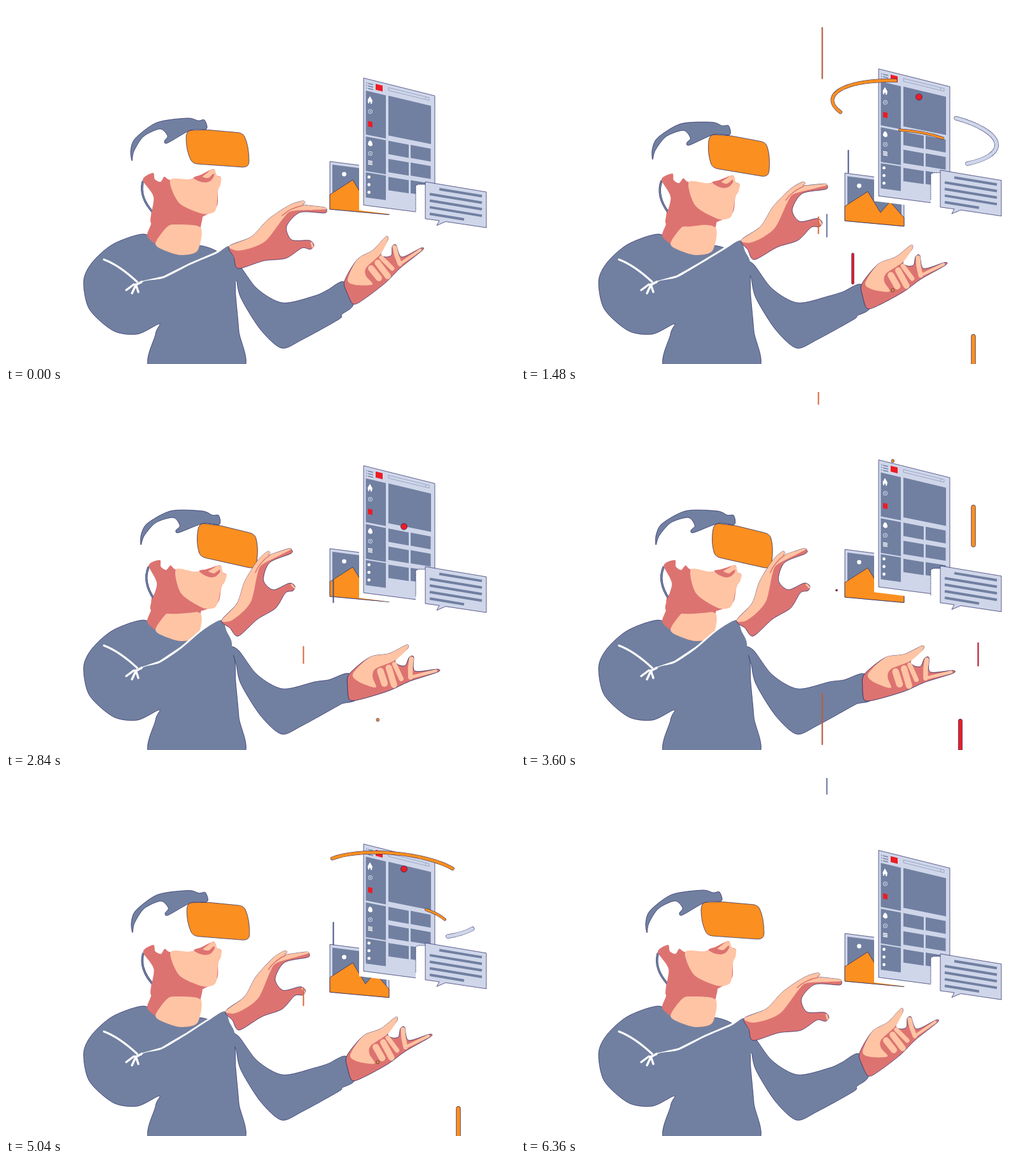
An HTML page that plays this animation: 800 by 562 pixels, repeating every 6.4 s.

```html
<!DOCTYPE html>
<html lang="en">
<head>
<meta charset="utf-8">
<title>Virtual reality</title>
<style>
  html, body { margin: 0; width: 100%; height: 100%; overflow: hidden; background: #fff; }
  svg { display: block; width: 100vw; height: 100vh; }
</style>
</head>
<body>
<svg id="stage" viewBox="0 0 800 562"></svg>
<script>
const LOOP = 6400;
const NAVY = '#7180a1', PALE = '#cfd6ea', ORANGE = '#fb8f20', RED = '#ed1c24';
const SKIN = '#fec4a4', SHADE = '#dd7371', INK = '#23235f', WHITE = '#fff', GREY = '#9aa6c4';

const stage = document.getElementById('stage');

function add(parent, tag, attrs) {
  const node = document.createElementNS('http://www.w3.org/2000/svg', tag);
  for (const key in attrs) node.setAttribute(key, attrs[key]);
  return parent.appendChild(node);
}
const group = () => add(stage, 'g', {});
const outline = on => on ? { stroke: INK, 'stroke-width': 0.7 } : {};

function points(text) {
  const n = text.trim().split(/\s+/).map(Number);
  return Array.from({ length: n.length / 2 }, (_, i) => [n[2 * i], n[2 * i + 1]]);
}

// Closed soft curve through the points
function softPath(pts, k = 0.14) {
  const at = i => pts[(i + pts.length) % pts.length];
  return 'M' + pts[0] + pts.map((p, i) => {
    const [a, b, c] = [at(i - 1), at(i + 1), at(i + 2)];
    return `C${p[0] + (b[0] - a[0]) * k} ${p[1] + (b[1] - a[1]) * k} ` +
           `${b[0] - (c[0] - p[0]) * k} ${b[1] - (c[1] - p[1]) * k} ${b[0]} ${b[1]}`;
  }).join('') + 'Z';
}
const soft = (parent, fill, text, inked) =>
  add(parent, 'path', { d: softPath(points(text)), fill, ...outline(inked) });
const poly = (parent, fill, pts, inked) =>
  add(parent, 'polygon', { points: pts, fill, ...outline(inked) });
const line = (parent, d, stroke, width, cap = 'round') => add(parent, 'path',
  { d, fill: 'none', stroke, 'stroke-width': width, 'stroke-linecap': cap, 'stroke-linejoin': 'round' });
const dot = (parent, cx, cy, r, fill) => add(parent, 'circle', { cx, cy, r, fill });

// Picture card
const card = group();
poly(card, PALE, '509,244 602,256 602,327.5 509,319', true);
poly(card, NAVY, '513,249 598,260 598,324 513,316');
poly(card, ORANGE, '509,296 545,273 565,306 580,289 602,314 602,327.5 509,319', true);
dot(card, 531.5, 264, 3.4, WHITE);

// Browser window: y is measured on the left edge, and rows slope less towards the bottom
const browser = group();
const sloped = (x, y) => y + (x - 562) * (0.25 - 0.0006 * (y - 112));
const slab = (fill, x1, x2, y1, y2, inked) => poly(browser, fill,
  [[x1, y1], [x2, y1], [x2, y2], [x1, y2]].map(([x, y]) => [x, sloped(x, y)]), inked);
slab(WHITE, 555, 676, 106, 321);
slab(PALE, 562, 674, 112.5, 312, true);
slab(RED, 581, 592, 117, 126.5);
slab(PALE, 601, 665, 118, 122.5).setAttribute('stroke', GREY);
slab(GREY, 659, 660, 118, 122.5);
slab(NAVY, 601, 668, 131, 195);
for (let i = 0; i < 3; i++) {
  slab(NAVY, 566, 567.5, 118.5 + 4 * i, 120 + 4 * i);
  slab(NAVY, 569, 577, 118.5 + 4 * i, 120 + 4 * i);
  slab(NAVY, 601, 633, 203.5 + 29 * i, 225 + 29 * i);
  slab(NAVY, 636, 667.5, 203 + 29 * i, 224.5 + 29 * i);
}
slab(NAVY, 565.5, 597, 131.5, 200.5);
slab(NAVY, 565.5, 597, 203.5, 258);
slab(NAVY, 565.5, 597, 260, 299.5);
poly(browser, WHITE, '572,141 576,148 575,153 573,153 573,150 571,150 571,152.5 569,152 568.5,147');
slab(RED, 569, 576, 178.5, 187);
soft(browser, WHITE, '572.5 210.5 575 213 576 218 572.5 219.5 569 217 570 212.5');
for (const y of [165, 231]) {
  dot(browser, 572.5, y, 3.5, PALE);
  dot(browser, 572.5, y, 2.5, NAVY);
  dot(browser, 572.5, y, 1.1, PALE);
}
for (let i = 0; i < 3; i++) {
  slab(WHITE, 569, 576, 240.5 + 2.5 * i, 242 + 2.5 * i);
  dot(browser, 570.5, 268 + 12 * i, 2.4, WHITE);
}

// Chat bubble
const chat = group();
poly(chat, WHITE, '644,282 648,280 659,280 659,340 644,340');
line(chat, 'M644 322V282l4 -2h11', INK, 0.7).setAttribute('stroke-dasharray', '2 1.5');
poly(chat, PALE, '659,276 755,292 755,348 691,338.5 677,344.5 681,337 659,334', true);
for (let i = 0; i < 5; i++) {
  const left = i ? 666 : 681, right = i < 4 ? 748 : 720;
  const y = x => 298.5 + 10.3 * i + 0.165 * (x - 748);
  line(chat, `M${left} ${y(left)}L${right} ${y(right)}`, NAVY, 4, 'butt');
}

// Orbiting strokes: each sweeps along an open, tilted elliptic arc
function orbit(cx, cy, rx, ry, from, sweep, width, color, starts) {
  const g = add(stage, 'g', { transform: `rotate(5 ${cx} ${cy})` });
  const strokes = [line(g, '', INK, width + 1), line(g, '', color, width)];
  const at = f => {
    const a = (from + sweep * f) * Math.PI / 180;
    return `${cx + rx * Math.cos(a)} ${cy + ry * Math.sin(a)}`;
  };
  return t => {
    const head = starts.map(s => (t - s) * 0.0009).find(h => h > 0 && h < 1.39);
    const a = Math.max(0, head - 0.39), b = Math.min(1, head);
    const d = head ? `M${at(a)}A${rx} ${ry} 0 0 1 ${at(b)}` : '';
    strokes.forEach(s => s.setAttribute('d', d));
  };
}
const orbits = [
  orbit(617, 208, 131, 43, 133, 279, 5.5, PALE, [385, 3601]),
  orbit(600, 226, 96, 31, 225, 113, 3.4, ORANGE, [647, 3796]),
  orbit(606, 157, 117, 39, 136, 278, 4.6, ORANGE, [985, 4290])
];

// Far arm and torso
const sleeve = add(stage, 'path', { fill: NAVY, ...outline(true) });
soft(stage, NAVY, `217 358 168 374 135 403 122 432 131 476 169 510 207 515 241 499 235 515 230 572
  369.5 572 366 510 361 455 358 415 333 386 303 376 285 386 245 378`, true);

// Neck
soft(stage, SHADE, '222 361 228 342 231 320 262 312 306 325 306 347 301 384 278 391 258 387 237 375');
soft(stage, SKIN, '235 374 253 347 268 343 306 348 301 384 278 391 258 387');

// Head
const head = group();
line(head, 'M215 276Q209 300 231 324', INK, 3.4);
line(head, 'M215 276Q209 300 231 324', NAVY, 2.4);
soft(head, SHADE, `215 273 231 262 234 272 243 276 249 268 258 273 290 272 322 257 328 258 331 266 338 270
  333 290 331 315 306 332 260 343 228 341 232 300`);
soft(head, SKIN, `258 273 290 272 313 264 322 257 328 258 331 266 338 270 337 281 333 290 331 315 326 324
  308 326 272 309`);
soft(head, SHADE, '295 269 313 264 309 268 318 270 326 263 327 267 322 274 314 277 303 275');
soft(head, NAVY, `198 243 196 227 203 208 237 183 285 176 302 180 312 179 315 193 290 195 254 215 249 212
  254 204 242 193 216 205 201 228`, true);
add(head, 'path', { d: `M292 195Q283 195 283 207Q283 226 290 241Q293 247 301 248L372 253Q382 253 382 244
  Q382 220 375 205Q372 199 363 198.5L318 194.5Z`, fill: ORANGE, ...outline(true) });

// Near arm with its white crease
const crease = line(stage, '', WHITE, 4);
const nearArm = add(stage, 'path', { fill: NAVY });
line(stage, 'M154 398Q178 407 206 433', WHITE, 3.2);
line(stage, 'M189 446L201 437M198 451L204 438L213 433M204 437L208 449', WHITE, 3.4);

// Reaching hand
const nearHand = group();
soft(nearHand, SHADE, `351 377 386 362 412 335 445 313 466 306 470 309 467 312 500 316 504 320 500 325
  462 324 441 346 449 367 477 368 484 376 478 382 465 380 440 396 405 400 365 412 358 394`, true);
soft(nearHand, SKIN, `351 377 386 362 412 335 445 313 466 306 470 309 467 312 500 316 503 319 484 320
  449 322 436 333 410 367 388 379 364 384`);
line(nearHand, 'M434 329Q447 317 467 313', SHADE, 1.6);
line(nearHand, 'M480 372L482 378', SKIN, 3);

// Open hand
const farHand = group();
soft(farHand, SHADE, `532 432 552 398 577 383 597 362 600 367 589 389 597 394 606 391 607 378 613 375
  622 394 652 380 654 384 620 411 597 434 563 460 546 468 536 450`, true);
soft(farHand, SKIN, `537 430 552 398 577 383 597 362 600 367 589 389 566 411 566 424 576 437 550 438`);
line(farHand, 'M574 412L586 427', SKIN, 10);
line(farHand, 'M584 403L600 424', SKIN, 9.5);
line(farHand, 'M590 395L607 412', SKIN, 7);
line(farHand, 'M611 379L614 392L619 405', SKIN, 7);
line(farHand, 'M622 403L651 383', SKIN, 4.5);

// Falling pieces, given by the moments they enter the stage
const SPEED = 0.845;
const drops = [];
function fall(x, width, height, fill, starts) {
  for (const start of starts) {
    const node = add(stage, 'rect',
      { x: x - width / 2, width, height, rx: width / 2, fill, ...outline(width > 2.5) });
    drops.push({ node, start, height });
  }
}
const bursts = delay => [0, 759, 2038, 3279, 4319].map(burst => burst + delay);
const every = (first, gap, count = 2) => Array.from({ length: count }, (_, i) => first + gap * i);

fall(711, 6.6, 66, ORANGE, bursts(33));
fall(584.3, 4.6, 5, ORANGE, bursts(190));
fall(467.5, 2, 28, '#d9683c', bursts(297));
fall(514.5, 2, 37, '#4a5587', bursts(410));
fall(625.5, 10, 10, RED, bursts(546));
fall(690.5, 6, 101, RED, [...every(517, 1438), 2873]);
fall(750.5, 14, 14, RED, [...every(267, 1436), 3640]);
fall(732, 1.8, 73, '#5a6695', every(404, 1136));
fall(473.5, 2.2, 82, '#b5603f', [1344, ...every(1703, 1241)]);
fall(718.5, 2.2, 38, '#c01c34', every(1849, 1241));
fall(496, 3, 3, RED, every(1989, 1241));
fall(521.5, 3.6, 49, RED, every(963, 520));
fall(480.7, 1.8, 37, '#5a6695', every(1050, 5279));
fall(471.5, 4, 9, RED, [381]);
fall(644, 8, 12, NAVY, [1625]);

const clamp = u => Math.min(1, Math.max(0, u));
const easeBoth = u => (1 - Math.cos(Math.PI * clamp(u))) / 2;
const easeOut = u => 1 - (1 - clamp(u)) ** 2;
const span = (t, a, b) => (t - a) / (b - a);
const wave = (t, peak) => Math.cos(2 * Math.PI * (t - peak) / 3200);
const shiftY = (node, y) => node.setAttribute('transform', `translate(0 ${y})`);
const blend = (a, b, u) => a.map((p, i) => p.map((v, j) => v + (b[i][j] - v) * u));
const swing = (node, angle, pivot, scale, [x, y]) => node.setAttribute('transform',
  `rotate(${angle} ${pivot}) translate(${x} ${y}) scale(${scale}) translate(${-x} ${-y})`);

const armEdge = [points('213 435 248 427 290 406 330 389 350 377'), points('213 435 242 425 275 403 308 375 338 358')];
const armCuff = [points('357 393 365 412 350 440 220 470'), points('347 376 355 396 345 430 220 470')];
const farCuff = [points('505 446 531 433 546 468 528 484'), points('508 452 541 443 551 482 530 489')];
const farTop = points('352 400 366 406 395 444 435 466 485 455');
const farBottom = points('523 492 465 524 433 537 400 508 369 458 361 425 352 415');

function draw(t) {
  shiftY(card, 9.2 * (1 + wave(t, 1570)));
  shiftY(chat, -9.2 * (1 + wave(t, 1570)));
  shiftY(browser, -6 - 9.2 * wave(t, 1200));

  const nod = easeOut(span(t, 680, 2720)) - easeOut(span(t, 3840, 5430));
  head.setAttribute('transform', `rotate(${8.6 * nod} 225 335)`);

  const lift = easeBoth(span(t, 120, 2920)) - easeBoth(span(t, 3920, 6360));
  swing(nearHand, -24.8 * lift, '301 396', 1 - 0.045 * lift, [357, 394]);
  const edge = blend(...armEdge, lift);
  nearArm.setAttribute('d', softPath([...edge, ...blend(...armCuff, lift)]));
  crease.setAttribute('d', 'M' + edge.map(([x, y]) => `${x} ${y - 1}`).join('L'));

  const lower = easeBoth(span(t, 0, 3320)) - easeBoth(span(t, 3320, 6400));
  swing(farHand, 21.4 * lower, '503 459', 1 + 0.06 * lower, [540, 450]);
  sleeve.setAttribute('d', softPath([...farTop, ...blend(...farCuff, lower), ...farBottom]));

  orbits.forEach(update => update(t));
  drops.forEach(({ node, start, height }) => {
    const y = SPEED * (t - start) - height;
    node.setAttribute('y', y);
    node.setAttribute('visibility', t >= start && y < 562 ? 'visible' : 'hidden');
  });
}

const begin = performance.now();
function tick() {
  const t = (performance.now() - begin) % LOOP;
  draw(Math.floor(t / 40) * 40);
  requestAnimationFrame(tick);
}
tick();
</script>
</body>
</html>
```
